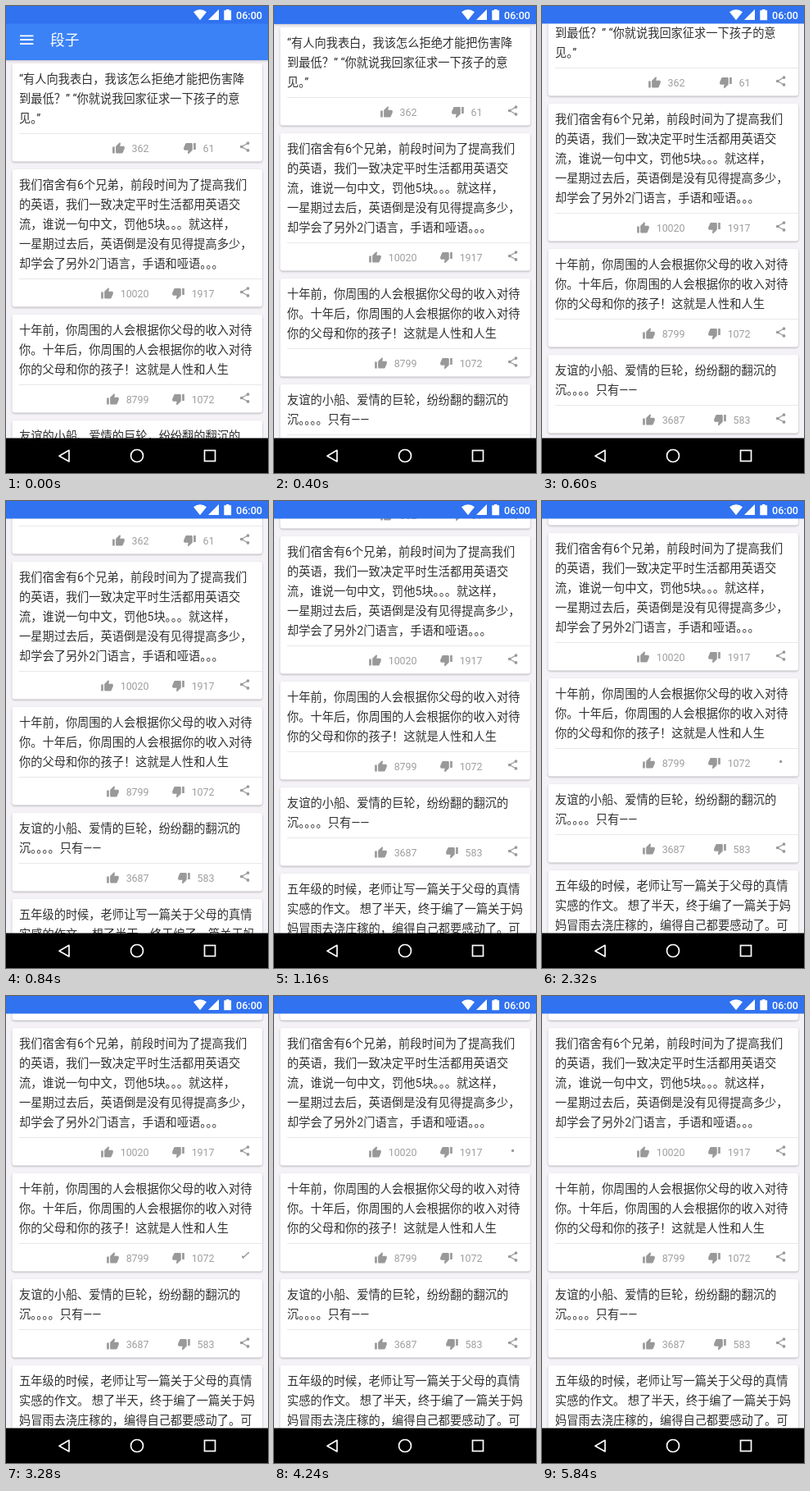
Recreate the animation shown at these times as an HTML page. Size 320x569 px, loop 5920 ms.

```html
<!DOCTYPE html>
<html lang="zh-CN">
<head>
<meta charset="utf-8">
<style>
  html, body { margin: 0; width: 100%; height: 100%; overflow: hidden; background: #f4f2f6; }
  svg { display: block; width: 100%; height: 100%; }
  text { font-family: Roboto, "Noto Sans CJK SC", "Noto Sans CJK", sans-serif; white-space: pre; }
  .body { font-size: 14.22px; fill: #303030; }
  .count { font-size: 12.44px; fill: #9e9e9e; text-anchor: end; }
  .card { fill: #fff; filter: drop-shadow(0 1px 1px rgba(0, 0, 0, .27)); }
  .icon { fill: #999; }
  .share { stroke: #999; fill: none; stroke-linecap: round; stroke-linejoin: round; }
  .bar { filter: drop-shadow(0 1.5px 1.5px rgba(0, 0, 0, .2)); }
</style>
</head>
<body>
<svg viewBox="0 0 320 569">
  <rect width="320" height="569" fill="#f4f2f6"/>
  <g id="posts"></g>
  <g id="app-bar">
    <rect class="bar" y="16" width="320" height="50" fill="#3b82f7"/>
    <path d="M17 36.3h16.5M17 41.2h16.5M17 46.1h16.5" stroke="#fff" stroke-width="1.7"/>
    <text x="54" y="47.5" font-size="17.8" fill="#fff">段子</text>
  </g>
  <rect width="320" height="21.5" fill="#3072f0"/>
  <g fill="#fff">
    <path d="M237 17.3L229 7.2Q237 1.4 245 7.2Z"/>
    <path d="M260 4V17H247Z"/>
    <path d="M266.3 5.3h2.6V4h3.6v1.3h2.6V17.3h-8.8Z"/>
    <text x="281" y="16" font-size="12.6" font-weight="500">06:00</text>
  </g>
  <rect y="526.5" width="320" height="43" fill="#000"/>
  <g fill="none" stroke="#fff" stroke-width="1.7">
    <path d="M77 541.3V555L65 548.2Z" stroke-linejoin="round"/>
    <circle cx="160" cy="548" r="7.5"/>
    <rect x="242.5" y="541.5" width="13" height="13"/>
  </g>
</svg>
<script>
const LOOP = 5920, STEP = 40;
const THUMB_UP = 'M1 21h4V9H1v12zm22-11c0-1.1-.9-2-2-2h-6.3l1-4.6v-.3c0-.4-.2-.8-.5-1.1L14.2 1 7.6 7.6C7.2 8 7 8.5 7 9v10c0 1.1.9 2 2 2h9c.8 0 1.5-.5 1.8-1.2l3-7.1c.1-.2.2-.5.2-.7v-2z';

const posts = [
  { up: 362, down: 61, lines: [
    '“有人向我表白，我该怎么拒绝才能把伤害降',
    '到最低？” “你就说我回家征求一下孩子的意',
    '见。”'] },
  { up: 10020, down: 1917, lines: [
    '我们宿舍有6个兄弟，前段时间为了提高我们',
    '的英语，我们一致决定平时生活都用英语交',
    '流，谁说一句中文，罚他5块。。。就这样，',
    '一星期过去后，英语倒是没有见得提高多少，',
    '却学会了另外2门语言，手语和哑语。。。'] },
  { up: 8799, down: 1072, lines: [
    '十年前，你周围的人会根据你父母的收入对待',
    '你。十年后，你周围的人会根据你的收入对待',
    '你的父母和你的孩子！这就是人性和人生'] },
  { up: 3687, down: 583, lines: [
    '友谊的小船、爱情的巨轮，纷纷翻的翻沉的',
    '沉。。。。只有——'] },
  { up: 2045, down: 318, lines: [
    '五年级的时候，老师让写一篇关于父母的真情',
    '实感的作文。 想了半天，终于编了一篇关于妈',
    '妈冒雨去浇庄稼的，编得自己都要感动了。可'] }
];

// A thumb icon followed by its count, which ends at the given x.
function counter(value, right, bottom, flipped) {
  const x = right - String(value).length * 6.985 - 24.2;
  const place = flipped
    ? `translate(${x + 16} ${bottom - 9}) scale(-.667)`
    : `translate(${x} ${bottom - 24.5}) scale(.667)`;
  return `<path class="icon" transform="${place}" d="${THUMB_UP}"/>
    <text class="count" x="${right}" y="${bottom - 12.2}">${value}</text>`;
}

function cardMarkup({ up, down, lines }, y) {
  const height = lines.length * 24 + 48, bottom = y + height;
  return `<rect class="card" x="7.5" y="${y}" width="305.5" height="${height - .5}" rx="3"/>
    ${lines.map((s, i) => `<text class="body" x="16" y="${y + 24.3 + i * 24}">${s}</text>`).join('')}
    <path d="M16 ${bottom - 34.5}H313" stroke="#e8e8e8"/>
    ${counter(up, 174.6, bottom, false)}${counter(down, 254.6, bottom, true)}
    <g class="share" transform="translate(291.6 ${bottom - 18.5})"><path/><path/></g>`;
}

const postList = document.getElementById('posts');
const appBar = document.getElementById('app-bar');
let cardTop = 70, markup = '';
for (const post of posts) {
  markup += cardMarkup(post, cardTop);
  cardTop += post.lines.length * 24 + 57;
}
postList.innerHTML = markup;
const shares = [...document.querySelectorAll('.share')];

// Scroll keys: time, offset, velocity.
const scrollKeys = [[0, 0, .08], [400, 44, .15], [840, 125, .15], [1160, 156, .045], [1320, 160, 0]];

function scrollAt(t) {
  const i = scrollKeys.findIndex(k => k[0] > t);
  if (i < 0) return 160;
  const [t0, y0, v0] = scrollKeys[i - 1], [t1, y1, v1] = scrollKeys[i];
  const d = t1 - t0, u = (t - t0) / d, w = 1 - u;
  return w * w * (1 + 2 * u) * y0 + u * u * (3 - 2 * u) * y1 + d * u * w * (w * v0 - u * v1);
}

// Each pose: x, y of three joined nodes, then node radius and line width.
const SHARE = [3.9, -4.4, -3.9, 0, 3.9, 4.4, 1.85, 1.2];
const DOT = [0, 0, 0, 0, 0, 0, 1.7, 1.2];
const TICK = [4.5, -4.6, -1.4, 1.5, -4.5, -1.4, .75, 1.5];
const shareKeys = [[0, SHARE], [520, DOT], [1160, DOT], [1440, TICK], [1680, TICK], [2200, SHARE]];

function poseAt(t) {
  const i = shareKeys.findIndex(k => k[0] > t);
  if (i < 1) return SHARE;
  const [t0, a] = shareKeys[i - 1], [t1, b] = shareKeys[i];
  const u = (t - t0) / (t1 - t0), e = u * u * (3 - 2 * u);
  return a.map((v, n) => v + (b[n] - v) * e);
}

function drawShare(group, [ax, ay, bx, by, cx, cy, radius, width]) {
  const [line, dots] = group.children;
  line.setAttribute('d', `M${ax} ${ay}L${bx} ${by}L${cx} ${cy}`);
  line.setAttribute('stroke-width', width);
  dots.setAttribute('d', `M${ax} ${ay}h.01M${bx} ${by}h.01M${cx} ${cy}h.01`);
  dots.setAttribute('stroke-width', radius * 2);
}

// Post index and the time its share icon is tapped.
const taps = { 1: 3640, 2: 1440 };

function render(now) {
  const t = Math.floor(now % LOOP / STEP) * STEP;
  const y = scrollAt(t);
  postList.setAttribute('transform', `translate(0 ${-Math.round(y)})`);
  appBar.setAttribute('transform', `translate(0 ${-Math.round(Math.min(y, 60))})`);
  shares.forEach((group, i) => drawShare(group, i in taps ? poseAt(t - taps[i]) : SHARE));
}

const startTime = performance.now();
function animate() {
  render(performance.now() - startTime);
  requestAnimationFrame(animate);
}
animate();
</script>
</body>
</html>
```
